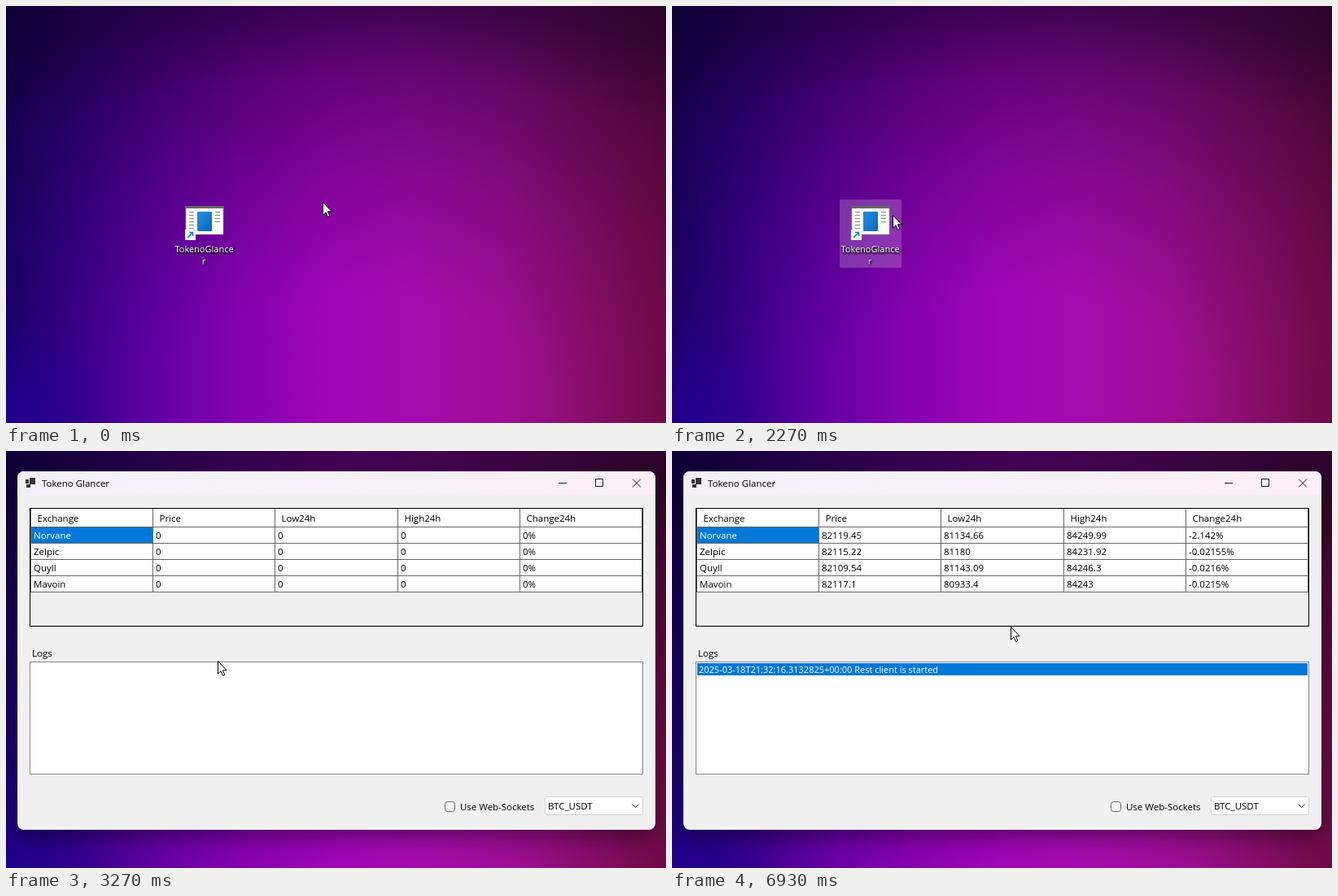
An HTML page that plays this animation: 811x513 px, repeating every 8000 ms.

```html
<!DOCTYPE html>
<html lang="en">
<head>
<meta charset="utf-8">
<title>Tokeno Glancer</title>
<style>
html, body { margin: 0; width: 100%; height: 100%; overflow: hidden; }
body {
  background:
    radial-gradient(circle 130px at 10px 510px, #2400a0aa, #2400a000),
    radial-gradient(900px 490px at 430px 480px, #08001a00 25%, #08001a30 55%, #08001a62 79%, #08001aa4 98%, #08001ab4 112%),
    linear-gradient(90deg, #1e0076, #3e0092 90px, #6600a6 190px, #8602b0 290px, #9e06b6 400px, #a40cae 500px, #9e0e96 610px, #8c0e6c 720px, #7c0c4c 811px);
}
svg { display: block; width: 811px; height: 513px; font: 11.5px "Open Sans", "Noto Sans", sans-serif; }
text { white-space: pre; }
#label { fill: #fff; font-size: 11px; text-anchor: middle; filter: drop-shadow(0 1px 1px #000) drop-shadow(1px 1px 1px #000a); }
#log { font-size: 11px; }
#frame { filter: drop-shadow(0 8px 14px #0007); }
.line { fill: none; stroke: #1a1a1a; }
</style>
</head>
<body>
<svg viewBox="0 0 811 513">
  <defs>
    <linearGradient id="bar"><stop stop-color="#f3f0fa"/><stop offset="1" stop-color="#faeff4"/></linearGradient>
    <linearGradient id="blue" x2="1" y2="1"><stop stop-color="#2590e4"/><stop offset="1" stop-color="#0a63b8"/></linearGradient>
  </defs>

  <g id="desktop">
    <rect id="hover" x="206" y="238" width="76" rx="2" fill="#fff" fill-opacity=".2"/>
    <path d="M221 247h46v34h-46z" fill="#fcfcfc" stroke="#999" stroke-opacity=".6"/>
    <path d="M220 246h48v3h-48z" fill="#666"/>
    <path d="M225 253.5h6m-6 4h6m-6 4h6m-6 4h6m-6 4h6m-6 4h6M257 253.5h6m-6 4h6m-6 4h6m-6 4h6" stroke="#888"/>
    <rect x="235" y="253" width="18" height="24" rx="1" fill="url(#blue)"/>
    <path d="M220 275h13v13h-13z" fill="#fff"/>
    <path d="M223 285l6-6m-4-.5h4.5v4.5" fill="none" stroke="#0a84d8" stroke-width="1.6"/>
    <g id="label"><text id="name" x="243.5" y="303"></text><text id="rest" x="243" y="318">r</text></g>
  </g>

  <g id="window">
    <rect id="frame" x="14" y="25" width="784" height="441" rx="8" fill="#f0f0f0"/>
    <path d="M14 54V33a8 8 0 0 1 8-8H790a8 8 0 0 1 8 8V54z" fill="url(#bar)"/>
    <path d="M29 33h7v8h-7zM24 35h4v5h-4zM25 41h5v4h-5z" fill="#333"/>
    <text x="44" y="44">Tokeno Glancer</text>
    <path class="line" d="M679 39.5h10M724.5 34.5h9v9h-9zM770 34.5l10 10m0-10l-10 10"/>
    <g id="content">
      <path d="M30 71h752v103H30z" fill="#fff"/>
      <path d="M31 94h149v19H31z" fill="#0078d7"/>
      <g id="cells"></g>
      <path class="line" style="stroke:#666" d="M30 93.5h752m-752 20h752m-752 20h752m-752 20h752m-752 20h752M180.5 71v103m150-103v103m151-103v103m150-103v103M30.5 71v103m751-103v103"/>
      <rect id="border" class="line" x="29.5" y="70.5" width="753" height="145"/>
      <rect x="29.5" y="259.5" width="753" height="138" fill="#fff" stroke="#828790"/>
      <g id="log">
        <path d="M31 261h750v15H31z" fill="#0078d7"/>
        <text x="33" y="273" fill="#fff">2025-03-18T21:32:16.3132825+00:00 Rest client is started</text>
      </g>
      <path id="blank" d="M30 241h31v15H30zM539 429h117v20H539zM662 425h121v23H662z" fill="#fbfbfb"/>
      <g id="controls">
        <text x="32" y="253">Logs</text>
        <rect x="539.5" y="431.5" width="12" height="12" rx="3" fill="#f5f5f5" stroke="#666"/>
        <text x="558" y="442">Use Web-Sockets</text>
        <rect x="662.5" y="425.5" width="120" height="22" rx="2" fill="#fff" stroke="#d0d0d0"/>
        <text x="666" y="441">BTC_USDT</text>
        <path class="line" d="M769.5 434.5l4 4 4-4"/>
      </g>
    </g>
  </g>

  <circle id="busy" cx="260" cy="258" r="8" fill="none" stroke="#1c8fe3" stroke-width="4"/>
  <path id="arrow" d="M.5.5V16.2L4 12.8 6.4 18.4 8.8 17.4 6.4 11.8H11.2z" fill="#fff" stroke="#000"/>
</svg>
<script>
const $ = id => document.getElementById(id);
const show = (id, on) => $(id).style.display = on ? "" : "none";
const clamp = v => Math.min(1, Math.max(0, v));

const heads = ["Exchange", "Price", "Low24h", "High24h", "Change24h"];
const rows = [
  ["Norvane", "82119.45", "81134.66", "84249.99", "-2.142%"],
  ["Zelpic", "82115.22", "81180", "84231.92", "-0.02155%"],
  ["Quyll", "82109.54", "81143.09", "84246.3", "-0.0216%"],
  ["Mavoin", "82117.1", "80933.4", "84243", "-0.0215%"]
];
const zeros = ["", "0", "0", "0", "0%"];
const colX = [34, 184, 334, 485, 635];

// Pointer moves: start, end, x, y
const moves = [
  [0, 200, 399, 243],
  [1800, 2370, 260, 258],
  [4000, 4300, 302, 226],
  [4570, 5030, 380, 228],
  [5640, 5830, 404, 222],
  [6070, 6200, 407, 217],
  [6800, 6930, 416, 216]
];

function drawCells(loaded) {
  const text = (x, y, s, fill = "#000") => `<text x="${x}" y="${y}" fill="${fill}">${s}</text>`;
  $("cells").innerHTML =
    heads.map((h, c) => text(colX[c] + 4.5, 87, h)).join("") +
    rows.map((row, r) => row.map((s, c) =>
      text(colX[c], 108 + 20 * r, c && !loaded ? zeros[c] : s, r || c ? "#000" : "#fff")).join("")).join("");
}

function pointer(t) {
  let x = 389, y = 241;
  for (const [from, to, toX, toY] of moves) {
    let p = clamp((t - from) / (to - from));
    if (to === 2370) p = p * p * (3 - 2 * p);
    x += (toX - x) * p;
    y += (toY - y) * p;
  }
  return [Math.round(x), Math.round(y)];
}

let wasLoaded;
function frame() {
  const t = performance.now() % 8000;
  const open = t >= 3070, ready = t >= 3200, loaded = t >= 3650;

  show("hover", t >= 2270);
  $("hover").setAttribute("height", open ? 69 : 84);
  $("name").textContent = open ? "TokenoGla..." : "TokenoGlance";
  show("rest", !open);

  show("window", open);
  const scale = 1 - .132 * (1 - clamp((t - 3070) / 230)) ** 3.5;
  $("window").setAttribute("transform", `translate(340 214) scale(${scale}) translate(-340 -214)`);
  $("window").setAttribute("opacity", clamp(.24 + (t - 3070) / 82));
  show("content", t >= 3100);
  show("blank", !ready);
  show("controls", ready);
  $("border").style.stroke = ready ? "#000" : "#fff";
  show("log", loaded);
  if (loaded !== wasLoaded) drawCells(wasLoaded = loaded);

  const busy = open && t < 3100;
  show("busy", busy);
  show("arrow", !busy);
  $("arrow").setAttribute("transform", `translate(${pointer(t)})`);
  requestAnimationFrame(frame);
}
frame();
</script>
</body>
</html>
```
